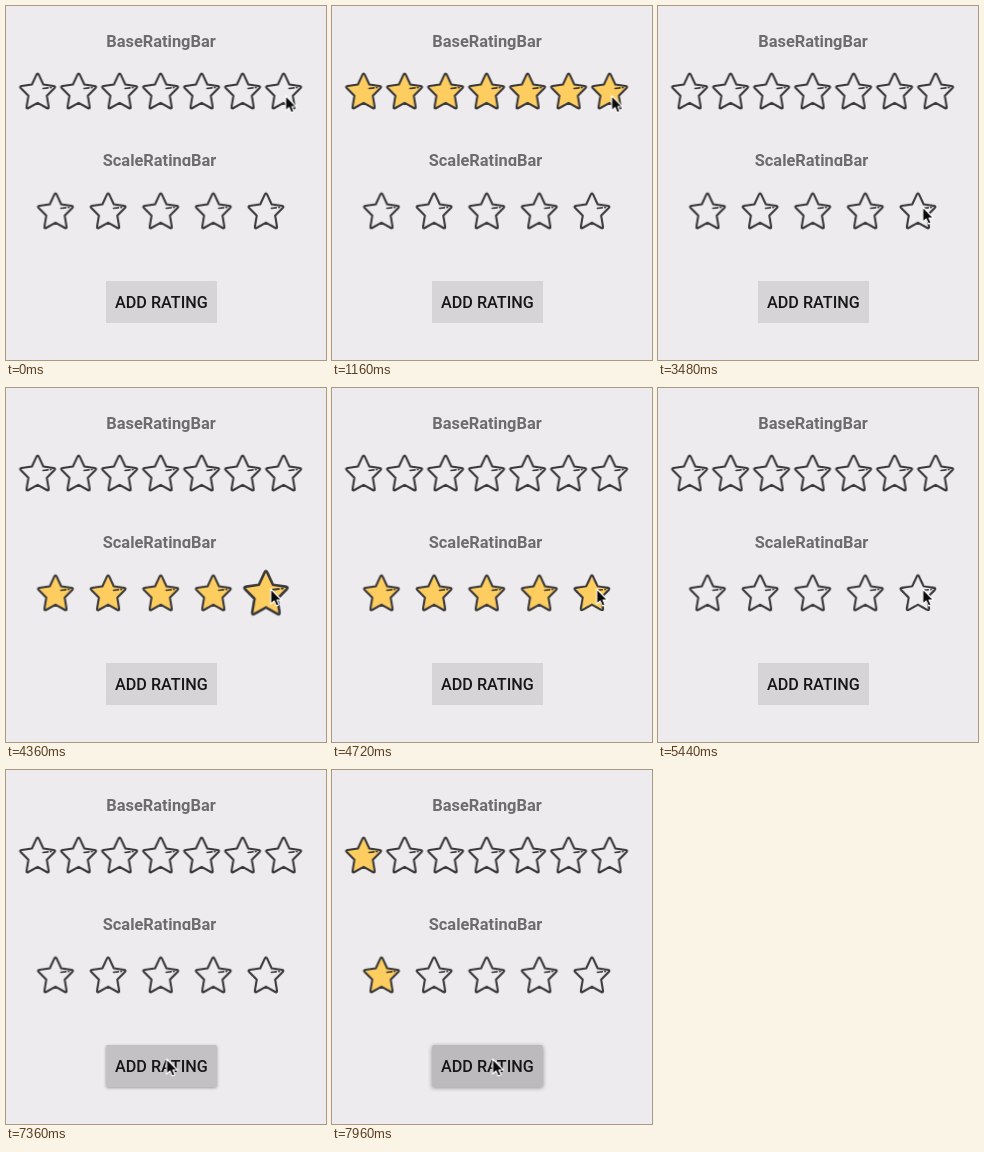
An HTML page for the animation above (8 s loop, 320 by 354 pixels).

```html
<!DOCTYPE html>
<html lang="en">
<head>
<meta charset="utf-8">
<title>Rating bars</title>
<style>
  html, body { margin: 0; width: 100%; height: 100%; overflow: hidden; background: #edebee; }
  svg { display: block; width: 320px; height: 354px; }
  text { font-family: Roboto, "Liberation Sans", sans-serif; text-anchor: middle; }
  .title { font-size: 16.4px; font-weight: 700; fill: #6d6b6e; }
  .label { font-size: 16.2px; font-weight: 500; fill: #161617; }

  .line { fill: none; stroke: #39383b; stroke-width: 2.1; stroke-linejoin: round; stroke-linecap: round; }
  .gloss { stroke-width: 1.6; }
  .gold { fill: #fecd60; }

  .gold, .lit, .pop, .face, .shade, .pointer { animation: 8s infinite both; }
  .base .lit { animation-name: base; animation-timing-function: step-end; }
  .scale .lit { animation-name: scale; animation-timing-function: step-end; }
  .scale .gold {
    animation-name: reveal;
    animation-timing-function: step-end;
    animation-delay: calc(var(--i) * 30ms);
  }
  .base .first .lit { animation-name: base-first; }
  .scale .first .lit { animation-name: scale-first; }
  .scale .first .pop { animation-name: pop-first; }
  .scale .last .pop { animation-name: pop-last; }
  .face { animation-name: press; }
  .shade { animation-name: lift; }
  .pointer { animation-name: travel; }

  @keyframes base { 0%, 30% { opacity: 0 } 13% { opacity: 1 } 100% { opacity: 0 } }
  @keyframes base-first { 0%, 30% { opacity: 0 } 13%, 93.5%, 100% { opacity: 1 } }
  @keyframes scale { 0%, 68% { opacity: 0 } 52.4% { opacity: 1 } 100% { opacity: 0 } }
  @keyframes scale-first { 0%, 68% { opacity: 0 } 52.4%, 93.5%, 100% { opacity: 1 } }
  @keyframes reveal { 0% { opacity: 0 } 52.4%, 100% { opacity: 1 } }
  @keyframes pop-last {
    0% { transform: scale(1); animation-timing-function: step-end }
    53.9% { transform: scale(1.26); animation-timing-function: ease-in-out }
    56.75%, 100% { transform: scale(1) }
  }
  @keyframes pop-first {
    0% { transform: scale(1); animation-timing-function: step-end }
    93.5% { transform: scale(1.26); animation-timing-function: ease-in-out }
    96.3%, 100% { transform: scale(1) }
  }
  @keyframes press {
    0%, 91.4% { fill: #d6d4d6 }
    92.8%, 94.5% { fill: #bcbabc }
    96.5%, 97.3% { fill: #c8c6c8 }
    98.8%, 100% { fill: #bcbabc }
  }
  @keyframes lift {
    0%, 91.4% { filter: drop-shadow(0 .8px .6px rgba(0, 0, 0, .24)) }
    92.8%, 94.5% { filter: drop-shadow(0 1.5px 2px rgba(0, 0, 0, .38)) }
    96.5%, 97.3% { filter: drop-shadow(0 1px 1.2px rgba(0, 0, 0, .3)) }
    98.8%, 100% { filter: drop-shadow(0 1.5px 2px rgba(0, 0, 0, .38)) }
  }
  @keyframes travel {
    0%, 37.4% { transform: translate(279.6px, 89.6px); animation-timing-function: ease-in-out }
    43.5%, 75.9% { transform: translate(264.7px, 201px); animation-timing-function: ease-in-out }
    80%, 100% { transform: translate(160.6px, 289px) }
  }
</style>
</head>
<body>
<svg viewBox="0 0 320 354">
  <defs>
    <path id="star"/>
    <clipPath id="cut"><rect x="80" y="140" width="150" height="20"/></clipPath>
  </defs>
  <text class="title" x="155" y="41">BaseRatingBar</text>
  <text class="title" x="153.5" y="159.5" clip-path="url(#cut)">ScaleRatingBar</text>
  <g class="base"></g>
  <g class="scale"></g>
  <g class="shade"><rect class="face" x="100" y="275" width="111" height="42" rx="2"/></g>
  <text class="label" x="155.4" y="302">ADD RATING</text>
  <path class="pointer" fill="#0b0b0b" stroke="#fff" stroke-width="1.1" stroke-linejoin="round"
    d="M0 0V15.2L3.4 12 5.6 16.9 8.3 15.7 6.2 11 10.8 11Z"/>
</svg>
<script>
  // Five-pointed star with rounded tips
  function starPath(outer, inner, soft) {
    const at = (r, k) => {
      const a = k * Math.PI / 5;
      return [r * Math.sin(a), 1.7 - 1.05 * r * Math.cos(a)];
    };
    const mix = (p, q) => p.map((v, i) => v + (q[i] - v) * soft);
    let d = '';
    for (let k = 0; k < 10; k += 2) {
      const tip = at(outer, k), next = at(inner, k + 1);
      const start = mix(tip, at(inner, k - 1));
      d += `${k ? 'L' : 'M'}${start}Q${tip} ${mix(tip, next)}L${next}`;
    }
    return d + 'Z';
  }

  function star(x, y, i, count) {
    const place = i === 0 ? 'first' : i === count - 1 ? 'last' : '';
    return `<g class="${place}" style="--i:${i}" transform="translate(${x} ${y})"><g class="pop">
      <g class="lit"><use href="#star" class="gold"/></g>
      <use href="#star" class="line"/>
      <path class="line gloss" d="M5.4-2.5 10.4-3.1M12.9-3.4 13.5-3.5"/>
    </g></g>`;
  }

  function fillRow(name, count, left, step, y) {
    let html = '';
    for (let i = 0; i < count; i++) html += star(left + i * step, y, i, count);
    document.querySelector(name).innerHTML = html;
  }

  document.querySelector('#star').setAttribute('d', starPath(19.5, 9.7, 0.2));
  fillRow('.base', 7, 31.6, 41, 85);
  fillRow('.scale', 5, 49.5, 52.6, 204.8);
</script>
</body>
</html>
```
